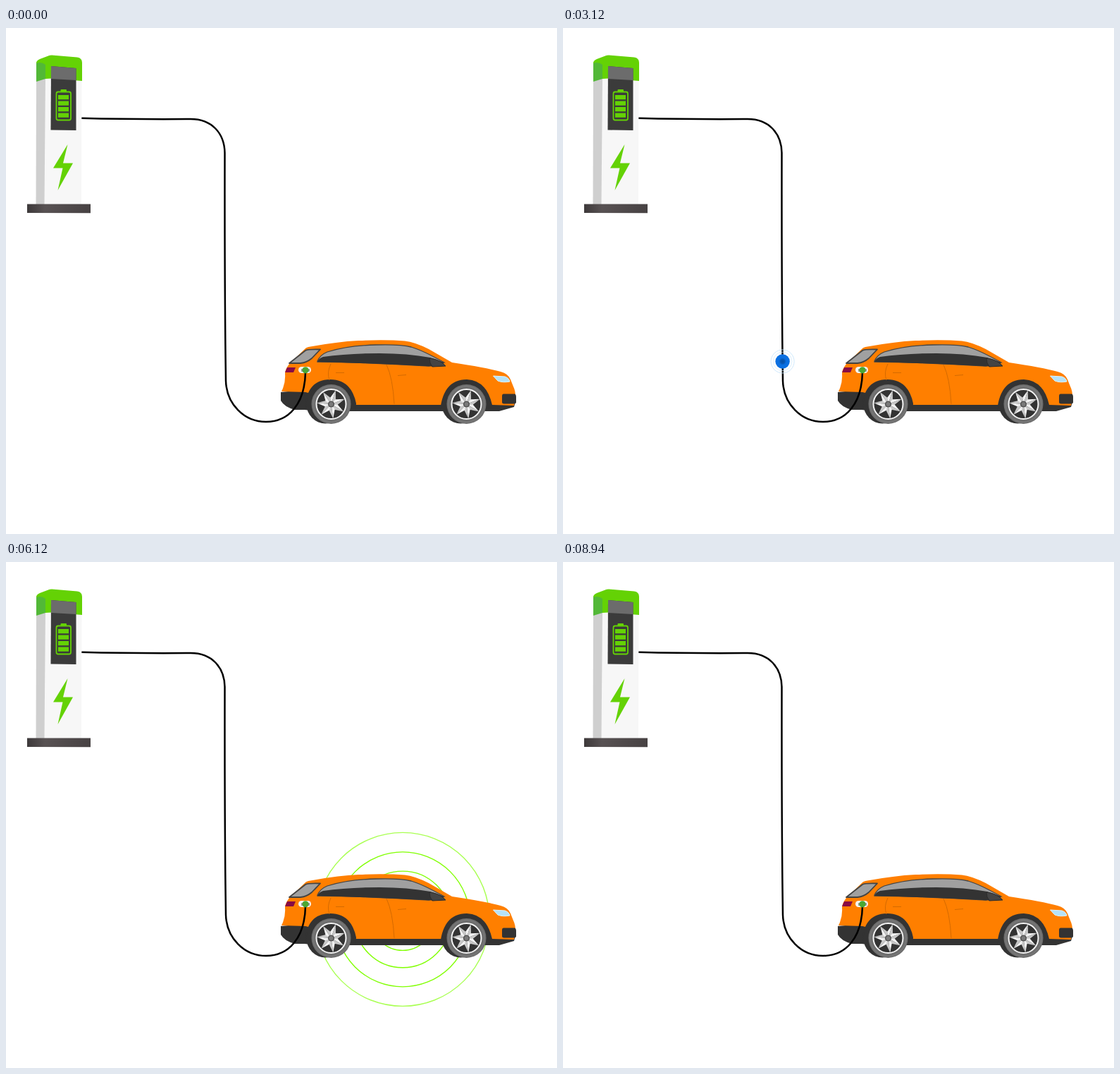
These frames come from a looping animation (782 by 717 pixels, 8970 ms). An HTML page:

```html
<!DOCTYPE html>
<html lang="en">
<head>
<meta charset="utf-8">
<title>Charging car</title>
<style>
  html, body { margin: 0; width: 100%; height: 100%; overflow: hidden; background: #fff; }
  svg { display: block; width: 100vw; height: 100vh; }
</style>
</head>
<body>
<svg viewBox="0 0 782 717">
  <defs>
    <radialGradient id="core">
      <stop offset="0" stop-color="#0650a6"/>
      <stop offset=".3" stop-color="#0859b6"/>
      <stop offset=".5" stop-color="#0a6fe0"/>
      <stop offset="1" stop-color="#0a70e2"/>
    </radialGradient>
    <linearGradient id="foot">
      <stop offset="0" stop-color="#3d393a"/>
      <stop offset=".28" stop-color="#585253"/>
      <stop offset="1" stop-color="#474243"/>
    </linearGradient>
    <g id="wheel">
      <ellipse cx="-8" cy=".5" rx="27" ry="27" fill="#333"/>
      <circle r="28" fill="#6e6e6e"/>
      <circle r="25.500" fill="none" stroke="#7d7d7d"/>
      <circle r="21" fill="#333" stroke="#f4f4f4" stroke-width="2"/>
      <g id="spokes"></g>
      <circle r="4.600" fill="#555"/>
      <circle r="3" fill="#7a7a7a"/>
    </g>
  </defs>

  <g id="rings" fill="none" stroke="#80ff00" stroke-width="1.4"></g>

  <g id="car">
    <path fill="#333" d="M390 516L432 512 497 530H616L690 531 723 530 721 537 700 543H490L430 541 410 541Q395 537 390 528Z"/>
    <path fill="#ff7f00" d="M391 515Q397 503 396 490Q396 484 402 476L424 455Q426 452 432 451.500Q470 444.500 500 443Q540 441.500 566 443.500Q580 445 600 455L633 474Q680 481 702 487Q713 490 716 498L720 508Q723 514 723 522L721 535 690 534H497L425 516Z"/>
    <path fill="#333" d="M424 541Q426 498 460 498Q490 498 497 532L496 543H440ZM616 543Q620 498 654 498Q682 499 690 534L684 542Z"/>
    <path fill="#333" d="M706 518.500H722Q724 519 724 523V531Q723 532.500 720 532.500H707Q704 532.500 704 530V521Q704 518.500 706 518.500Z"/>
    <path fill="#a0a0a0" stroke="#444" stroke-width="1.800" stroke-linejoin="round" d="M402 475L425 457Q428 455 446 455.500L434 468Q427 474 418 475Z"/>
    <path fill="#a0a0a0" stroke="#444" stroke-width="1.300" d="M442 472Q446 463 456 459Q485 450 525 449Q560 448 575 452Q592 457 622 474L600 479Q520 474 442 473Z"/>
    <path fill="#333" d="M442 473Q444 468 450 466Q485 461 530 461Q570 461 602 467L622 474 605 479.500Q520 475 442 473Z"/>
    <path fill="#444" stroke="#2b2b2b" d="M601 468Q612 469 620 475L624 479 605 480Q601 475 601 468Z"/>
    <path fill="none" stroke="#d46a00" d="M540 477Q549 496 551 533M461 476Q455 488 459 499M468 488.500H480M556 492.500L568 491.500"/>
    <path fill="#880c45" d="M399 481H411L408 488H396Z"/>
    <path fill="#b5e2f8" stroke="#dff4ff" d="M691.500 493L708 494Q714 496 715 501Q705 503 698 500Z"/>
    <rect x="415" y="480" width="18" height="9" rx="4.500" fill="#f5f5f5"/>
    <use href="#wheel" x="461.500" y="533"/>
    <use href="#wheel" x="653.500" y="533"/>
  </g>

  <path id="cable" fill="none" stroke="#000" stroke-width="2.500" d="M88 127.500L107 127.700Q180 129.600 262 129C292 129 310 149 310.500 177C310.300 300 310.500 400 312 500C313 533 338 558 369 558C402 558 424 532 425 488"/>
  <circle cx="425" cy="484.800" r="4.600" fill="#4aa832"/>
  <path stroke="#5f6a5c" stroke-width="1.200" d="M420 483V487M430 483V487"/>

  <g id="dot">
    <circle r="16.500" fill="none" stroke="#c9e6fb" stroke-width=".9"/>
    <circle r="13.300" fill="none" stroke="#d5ecfc" stroke-width=".8"/>
    <circle r="10.200" fill="url(#core)"/>
  </g>

  <g id="station">
    <path fill="#cfcfcf" d="M43 74L57 70 55 250H42.500Z"/>
    <path fill="#f7f7f7" d="M56 70L107.500 73 107 250H54.500Z"/>
    <path fill="#52b837" d="M43 50Q43 47 47 46L58 50 56 72 43 76Z"/>
    <path fill="#64d205" d="M43 50Q43 46 48 44L60 39.500Q63 38 68 38.700L101 41.500Q108 42.500 108 49V75L64 71.500 56 72V52Q50 47 43 50Z"/>
    <path fill="#3b3b3b" d="M64 54L99.500 57V145L63.500 144.500Z"/>
    <path fill="#6c6c6c" d="M64 54L99.500 57V74L64 72Z"/>
    <rect x="71.500" y="90.500" width="20.500" height="40" rx="2.500" fill="none" stroke="#64d205" stroke-width="1.800"/>
    <rect x="77.500" y="87" width="8.500" height="4" rx="1" fill="#64d205"/>
    <path fill="#64d205" d="M74 95h15v6.200h-15zM74 103.500h15v6.200h-15zM74 112h15v6.200h-15zM74 120.500h15v6.200h-15z"/>
    <path fill="#64d205" d="M87.500 165L67 198.500H80.500L73.500 230 95 191.500H81Z"/>
    <path fill="url(#foot)" d="M30 249.500H120V262.300L30 262Z"/>
  </g>
</svg>
<script>
const LOOP = 8970, SPEED = 0.175, DOT_END = 4330;
const RING_START = 4440, RING_STEP = 457, FADE_OUT = 8640, FADE_TIME = 300;
const $ = id => document.getElementById(id);
const clamp = v => Math.max(0, Math.min(1, v));

function add(parent, tag, attrs) {
  const el = document.createElementNS("http://www.w3.org/2000/svg", tag);
  for (const key in attrs) el.setAttribute(key, attrs[key]);
  return parent.appendChild(el);
}

for (let i = 0; i < 7; i++) {
  const turn = `rotate(${18 + i * 360 / 7})`;
  add($("spokes"), "path", { d: "M0 -20.5L-4.2 -8 0 0Z", fill: "#f2f2f2", transform: turn });
  add($("spokes"), "path", { d: "M0 -20.5L4.2 -8 0 0Z", fill: "#c8c8c8", transform: turn });
}

const rings = [44, 68.3, 95.5, 123, 152.5, 188.7].map(r =>
  add($("rings"), "circle", { cx: 563, cy: 506.4, r }));

const cable = $("cable"), dot = $("dot");

function draw(t) {
  const p = cable.getPointAtLength(t * SPEED);
  dot.setAttribute("transform", `translate(${p.x} ${p.y})`);
  dot.setAttribute("visibility", t < DOT_END ? "visible" : "hidden");

  const out = 1 - clamp((t - FADE_OUT) / FADE_TIME);
  rings.forEach((ring, i) => {
    const shown = clamp((t - RING_START - i * RING_STEP) / RING_STEP);
    ring.setAttribute("opacity", shown * out);
  });
}

const start = performance.now();
function tick() {
  draw((performance.now() - start) % LOOP);
  requestAnimationFrame(tick);
}
tick();
</script>
</body>
</html>
```
